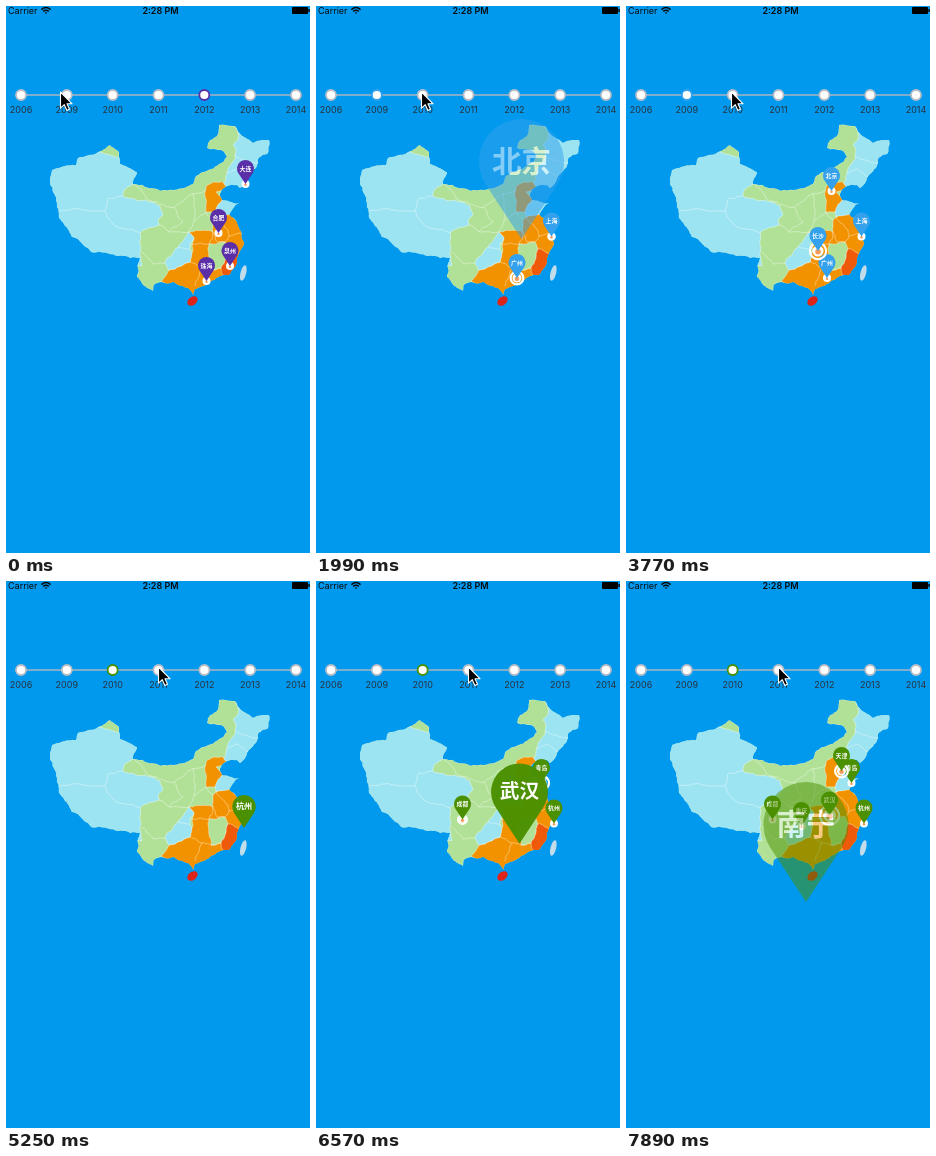
These frames come from a looping animation (304x547 px, 8000 ms). An HTML page:

```html
<!DOCTYPE html>
<html lang="zh">
<head>
<meta charset="utf-8">
<title>City timeline</title>
<style>
  html, body { margin: 0; width: 100%; height: 100%; overflow: hidden; background: #0099ee; }
  svg { display: block; width: 100%; height: 100%; }
  text { font-family: Inter, Roboto, "Liberation Sans", sans-serif; font-size: 9px; fill: #0a0a0a; }
  .year { fill: #29323c; text-anchor: middle; }
  .city { font: 700 5.9px "Noto Sans CJK SC", "Noto Sans CJK", sans-serif; fill: #fff; text-anchor: middle; }
  #map path { stroke: #fff; stroke-opacity: .7; stroke-width: .55; stroke-linejoin: round; }
</style>
</head>
<body>
<svg viewBox="0 0 304 547" preserveAspectRatio="none">
  <clipPath id="coast"></clipPath>
  <rect width="304" height="547" fill="#0099ee"/>
  <text x="2" y="8">Carrier</text>
  <g fill="none" stroke="#0a0a0a" stroke-width="1.4">
    <path d="M35.4 3.6Q40 -.4 44.6 3.6M37.2 5.4Q40 3 42.8 5.4"/>
    <path d="M38.6 6.4L40 8L41.4 6.4Z" fill="#0a0a0a" stroke="none"/>
  </g>
  <text x="154.5" y="8" text-anchor="middle" font-weight="600">2:28 PM</text>
  <rect x="286" y="1" width="16" height="7" rx="1" fill="#000"/>
  <rect x="302.4" y="3" width="1.4" height="3" fill="#000"/>
  <g id="axis"><path d="M15 89H290" stroke="#aab4c2" stroke-width="1.5"/></g>
  <g id="map" clip-path="url(#coast)"></g>
  <ellipse rx="5.8" ry="4" fill="#dd2418" transform="translate(186.5 295) rotate(-38)"/>
  <ellipse rx="2.8" ry="8" fill="#c3dcea" transform="translate(237.3 267) rotate(14)"/>
  <g id="pins"></g>
  <path id="cursor" d="M0 0V16.2L3.8 12.7L6.4 18.4L9 17.2L6.5 11.8H11.6Z"
        fill="#000" stroke="#fff" stroke-width="1.1" stroke-linejoin="round"/>
</svg>
<script>
const LOOP = 8000, DROP = 500, RIPPLE = 1100;
const PALE = '#9ce4f2', LEAF = '#b1e197', AMBER = '#f39200', RED = '#ee5a0a';
const $ = id => document.getElementById(id);
const clamp = v => Math.max(0, Math.min(1, v));
const smooth = v => v * v * (3 - 2 * v);

function add(parent, tag, attrs, text) {
  const el = document.createElementNS('http://www.w3.org/2000/svg', tag);
  for (const k in attrs) el.setAttribute(k, attrs[k]);
  if (text) el.textContent = text;
  parent.appendChild(el);
  return el;
}

// Rough borders: every edge is split at a midpoint shifted by seeded noise.
const noise = (x, y) => {
  const n = Math.sin(x * 12.9898 + y * 78.233) * 43758.5453;
  return n - Math.floor(n) - .5;
};
function rough(a, b) {
  const len = Math.hypot(a[0] - b[0], a[1] - b[1]);
  if (len < 2.6) return [b];
  const x = (a[0] + b[0]) / 2, y = (a[1] + b[1]) / 2, k = Math.min(len, 14) * .22;
  const mid = [x + noise(x, y) * k, y + noise(y, x) * k];
  return [...rough(a, mid), ...rough(mid, b)];
}
function trace(points, closed) {
  const p = points.split(' ').map(s => s.split(',').map(Number));
  if (closed) p.push(p[0]);
  return 'M' + [p[0], ...p.slice(1).flatMap((b, i) => rough(p[i], b))].join('L');
}
const area = (fill, points) => add($('map'), 'path', { fill, d: trace(points, true) });
const border = points => add($('map'), 'path', { fill: 'none', d: trace(points) });

// Coast and outer frontier; regions may run past it and are clipped.
const land = area(LEAF, '44,172 46,164 70,159 72,152 89,148 104,139 113,146 114,158 131,166 127,178 163,184 187,178 190,170 213,158 221,151 218,146 201,142 204,134 212,128 213,119 229,120 235,129 247,137 263,134 262,147 252,153 251,160 241,172 234,182 231,179 219,181 214,188 216,194 233,197 223,208 231,217 238,238 233,247 230,259 224,268 204,276 189,283 187,289 182,282 168,276 148,279 147,285 138,280 131,271 134,252 112,250 85,246 66,231 53,212 51,198');
add($('coast'), 'path', { d: land.getAttribute('d') });

area(PALE, '140,160 127,178 118,184 117,190 139,194 154,200 157,208 152,214 153,219 134,227 136,260 30,260 30,130');
area(PALE, '230,110 232,133 227,139 230,146 226,157 221,168 217,178 225,190 270,180 270,110');
area(AMBER, '200,181 208,176 217,176 222,182 210,186 217,194 209,206 200,206');
area(PALE, '209,206 217,193 240,190 224,209 210,211');
area(AMBER, '183,226 207,226 207,214 210,211 224,208 250,225 240,290 180,295 155,275 163,264 184,256 188,232');
area(LEAF, '203,238 219,236 222,243 215,262 205,264');
area(RED, '222,243 240,247 235,275 219,273 215,262');
area(PALE, '183,226 188,232 184,238 184,256 163,264 159,257 172,241');

// Inner borders, west to east
border('48,203 99,205 103,192 117,190');
border('99,205 107,218 134,227');
border('127,178 141,193 168,201 182,190 200,184');
border('153,219 163,226 183,226 188,215 187,187');
border('168,201 172,211 177,216 163,226');
border('136,246 147,258 159,257');
border('188,215 200,206 207,214');
border('172,241 184,244');
border('184,238 203,238 207,226 211,236 219,236 223,230 240,228');
border('210,211 222,224 223,230');
border('184,256 196,262 205,264 215,262');
border('196,262 189,280');
border('229,150 252,157');
border('221,167 232,163 244,173');

const rings = [2006, 2009, 2010, 2011, 2012, 2013, 2014].map((year, i) => {
  const x = 15 + i * 45.83;
  add($('axis'), 'text', { x, y: 107, class: 'year' }, String(year));
  return add($('axis'), 'circle', { cx: x, cy: 89, r: 5, fill: '#fff', 'stroke-width': 1.8 });
});

// Each year: its ring, the time it is chosen, its first drop, its cities with pin tips.
const groups = [
  { ring: 4, color: '#5b2fa8', from: 0, first: -LOOP,
    cities: '大连 239.5 178,合肥 212.5 227,泉州 224 260,珠海 200.5 275' },
  { ring: 1, color: '#34a1ec', from: 500, first: 945,
    cities: '广州 201 272,上海 235.5 230.5,北京 205.5 185,长沙 192 245' },
  { ring: 2, color: '#4a9000', from: 4360, first: 4845,
    cities: '杭州 238 242.5,青岛 225.5 202,成都 146.5 238.5,武汉 203.5 234.5,天津 215.5 190,重庆 175.5 245,南宁 180 273' }
];

groups.forEach((g, n) => {
  g.end = n + 1 < groups.length ? groups[n + 1].from : LOOP;
  g.el = add($('pins'), 'g', {});
  g.pins = g.cities.split(',').map((city, i) => {
    const [name, x, y] = city.split(' ');
    const spot = add(g.el, 'g', { transform: `translate(${x} ${y})` });
    const halo = add(spot, 'circle', { fill: 'none', stroke: '#fff', 'stroke-width': 2.2 });
    const disc = add(spot, 'circle', { fill: '#fff' });
    const core = add(spot, 'circle', { cy: .8, fill: '#f59a58' });
    const pin = add(g.el, 'g', {});
    add(pin, 'path', { d: 'M0 12L-7.1 1.2A8.5 8.5 0 1 1 7.1 1.2Z', fill: g.color });
    add(pin, 'text', { y: -1.5, class: 'city' }, name);
    return { x, y: y - 12, start: g.first + i * DROP, spot, halo, disc, core, pin };
  });
});

// A pin shrinks onto its place, then a target ring widens at the tip.
function drawPin(p, t) {
  const age = t - p.start, since = age - DROP, live = since < RIPPLE;
  const scale = 5.1 - 4.1 * smooth(clamp(age / DROP));
  p.pin.setAttribute('visibility', age < 0 ? 'hidden' : 'inherit');
  p.pin.setAttribute('opacity', clamp(.4 + age / 400));
  p.pin.setAttribute('transform', `translate(${p.x} ${p.y}) scale(${scale})`);
  p.spot.setAttribute('visibility', since < 0 ? 'hidden' : 'inherit');
  const r = live ? 4 + 7 * clamp(since / RIPPLE) : 4;
  p.halo.setAttribute('r', r - 1.1);
  p.disc.setAttribute('r', r * .6);
  p.core.setAttribute('r', r * .3);
}

const slide = (t, start) => smooth(clamp((t - start) / 250));

function draw(t) {
  for (const g of groups) {
    const on = t >= g.from && t < g.end;
    g.el.setAttribute('visibility', on ? 'visible' : 'hidden');
    if (!on) continue;
    g.pins.forEach(p => drawPin(p, t));
    rings.forEach((ring, i) => ring.setAttribute('stroke', i === g.ring ? g.color : '#b9bec6'));
  }
  const x = 54.5 + 51 * slide(t, 890) + 47 * slide(t, 4750);
  $('cursor').setAttribute('transform', `translate(${x} 86)`);
}

const origin = performance.now();
function tick() {
  draw((performance.now() - origin) % LOOP);
  requestAnimationFrame(tick);
}
tick();
</script>
</body>
</html>
```
